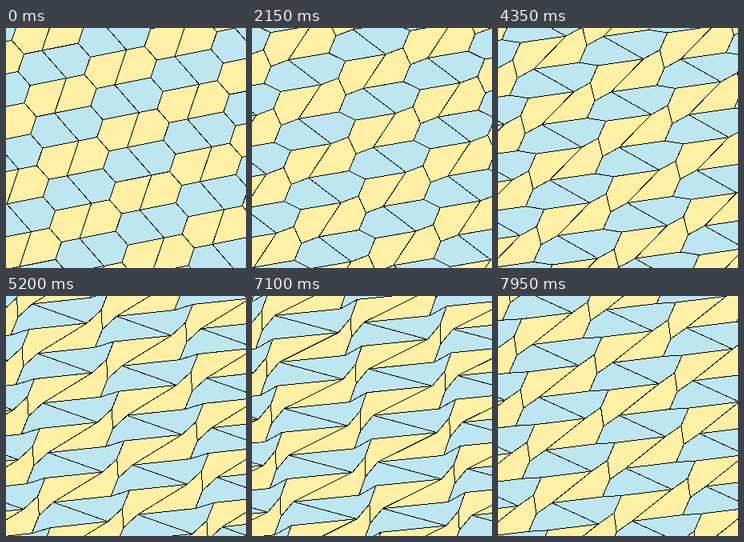
An HTML page that plays this animation: 300 by 300 pixels, repeating every 8 s.

```html
<!DOCTYPE html>
<html lang="en">
<head>
<meta charset="utf-8">
<title>Pentagonal tiling</title>
<style>
  html, body { margin: 0; width: 100%; height: 100%; overflow: hidden; }
  svg { display: block; width: 100vw; height: 100vh; background: #fff0a5; }
</style>
</head>
<body>
<svg viewBox="0 0 300 300" shape-rendering="crispEdges">
  <path id="blue" fill="#bee6f0"/>
  <path id="lines" fill="none" stroke="#000" stroke-width="1"/>
</svg>
<script>
const LOOP = 8000, STEP = 50, STEPS = 40, HOLD = 1000;
const PERIOD = HOLD + (STEPS - 1) * STEP;
const STOPS = [60, 40, 20, 40];       // angle B at each rest, in degrees
const CENTER = [151.5, 149.3];
const CELL_AREA = 6440;               // four tiles, in square pixels
const TILT = 25.2 * Math.PI / 180;    // direction of the first lattice vector

const add = (u, v) => [u[0] + v[0], u[1] + v[1]];
const sub = (u, v) => [u[0] - v[0], u[1] - v[1]];
const cross = (u, v) => u[0] * v[1] - u[1] * v[0];
const turn = (u, a, k = 1) => {
  const c = Math.cos(a) * k, s = Math.sin(a) * k;
  return [u[0] * c - u[1] * s, u[0] * s + u[1] * c];
};

// Pentagon with a = d = e, b = c, B + D = 180, E = 2B; corners A..E, B at 0
function pentagon(B) {
  const s = Math.sin(B), c = Math.cos(B);
  const D = [0, 0], E = [1, 0], C = [-c, s], A = [2 * s * s, 2 * s * c];
  const ac = sub(A, C), h = 0.5 / Math.tan(B / 2);
  const apex = [(A[0] + C[0]) / 2 - ac[1] * h, (A[1] + C[1]) / 2 + ac[0] * h];
  return [A, apex, C, D, E].map(p => sub(p, apex));
}

function tiling(B) {
  let X = pentagon(B);
  let Y = X.map(p => turn(p, B));
  const lattice = () => [sub(add(X[0], X[4]), X[2]), sub(Y[0], X[2])];
  let [u, v] = lattice();
  const scale = Math.sqrt(CELL_AREA / Math.abs(cross(u, v)));
  const angle = TILT - Math.atan2(u[1], u[0]);
  const place = p => turn(p, angle, scale);
  X = X.map(place);
  Y = Y.map(place);
  [u, v] = lattice();
  return { X, X2: X.map(p => sub(X[2], p)), Y, u, v };
}

const pt = (p, o) => (CENTER[0] + o[0] + p[0]).toFixed(2) + " " +
                     (CENTER[1] - o[1] - p[1]).toFixed(2);
const edges = (P, o, list) =>
  list.map(i => "M" + pt(P[i], o) + "L" + pt(P[(i + 1) % 5], o)).join("");
const shape = (P, o) => "M" + P.map(p => pt(p, o)).join("L") + "Z";

const blue = document.getElementById("blue");
const lines = document.getElementById("lines");

function draw(B) {
  const { X, X2, Y, u, v } = tiling(B);
  let fill = "", stroke = "";
  for (let i = -4; i <= 4; i++) {
    for (let j = -7; j <= 7; j++) {
      const o = [i * u[0] + j * v[0], i * u[1] + j * v[1]];
      if (Math.abs(o[0]) > 300 || Math.abs(o[1]) > 300) continue;
      fill += shape(X, o) + shape(X2, o);
      // each shared edge once
      stroke += edges(X, o, [0, 1, 2, 3, 4]) + edges(X2, o, [0, 2, 3]) + edges(Y, o, [0, 3]);
    }
  }
  blue.setAttribute("d", fill);
  lines.setAttribute("d", stroke);
}

function angleAt(t) {
  const leg = Math.floor(t / PERIOD), rest = t - leg * PERIOD;
  const k = rest < HOLD ? 0 : Math.floor((rest - HOLD) / STEP) + 1;
  const ease = (1 - Math.cos(Math.PI * k / STEPS)) / 2;
  const from = STOPS[leg % 4], to = STOPS[(leg + 1) % 4];
  return from + (to - from) * ease;
}

let shown = null;
const start = performance.now();
function tick() {
  const deg = angleAt((performance.now() - start) % LOOP);
  if (deg !== shown) draw((shown = deg) * Math.PI / 180);
  requestAnimationFrame(tick);
}
tick();
</script>
</body>
</html>
```
